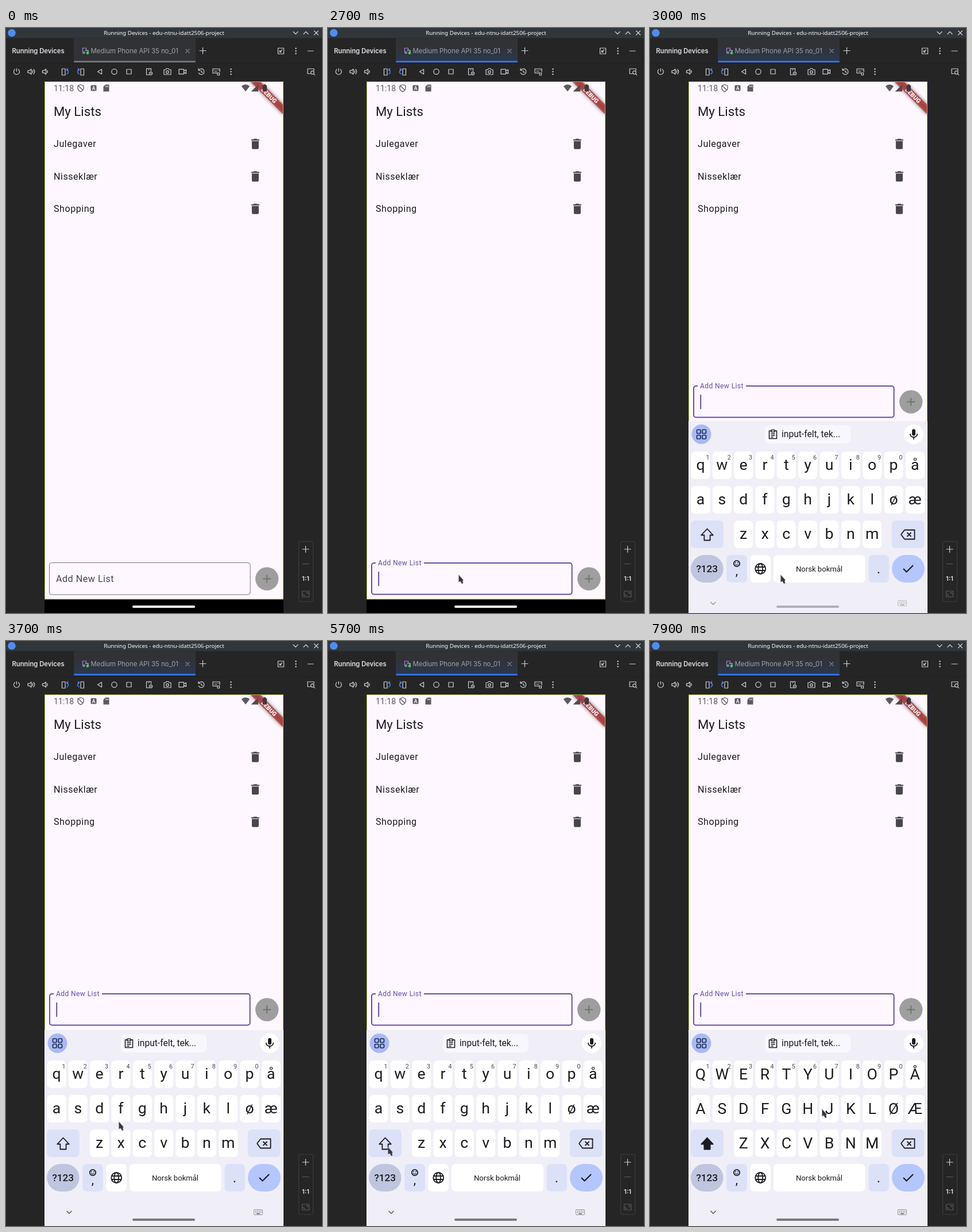
Animation, 550 px wide and 1018 px high, one loop 8 s. Source, as an HTML page:

```html
<!DOCTYPE html>
<html lang="en">
<head>
<meta charset="utf-8">
<title>Running Devices</title>
<style>
html, body { margin: 0; width: 100%; height: 100%; overflow: hidden; background: #252526; }
svg { display: block; width: 100vw; height: 100vh; }
.ui { font-family: Inter, sans-serif; }
.app { font-family: Roboto, sans-serif; }
.line { fill: none; stroke: #ced0d6; stroke-width: 1.2; stroke-linecap: round; stroke-linejoin: round; }
.dim { stroke: #5a5c60; }
.blue { stroke: #548af7; }
.ink { fill: none; stroke: #1b1b21; stroke-width: 1.8; stroke-linejoin: round; }
</style>
</head>
<body>
<svg id="stage" viewBox="0 0 550 1018" xmlns="http://www.w3.org/2000/svg">
  <defs>
    <linearGradient id="tabLive" x2="0" y2="1"><stop offset=".3" stop-color="#313235"/><stop offset="1" stop-color="#2b3850"/></linearGradient>
    <clipPath id="screen"><rect x="67" y="93" width="416" height="925"/></clipPath>
    <filter id="soft" x="-20%" y="-100%" width="140%" height="300%"><feGaussianBlur stdDeviation="3"/></filter>
  </defs>
  <rect width="550" height="1018" fill="#252526"/>
  <g id="frame" class="ui"></g>
  <g id="phone" class="app" clip-path="url(#screen)">
    <g id="home"></g>
    <g id="field"></g>
    <g id="nav"></g>
    <g id="keys"></g>
    <rect id="pill" x="220" y="1005" width="109" height="4" rx="2"/>
  </g>
  <path id="mouse" d="M.4 .4V13.2l2.9-1.5 2.9 4.5 2.1-1.2-.9-4 1.3-1.2z" fill="#38373c" stroke="#a9a6ad" stroke-width=".6"/>
</svg>
<script>
const LOOP = 8000;
const $ = id => document.getElementById(id);
const at = (x, y, body, extra = '') => `<g transform="translate(${x} ${y})" ${extra}>${body}</g>`;
const path = (d, cls = 'line', extra = '') => `<path class="${cls}" d="${d}" ${extra}/>`;
const rect = (x, y, w, h, r, fill, extra = '') =>
  `<rect x="${x}" y="${y}" width="${w}" height="${h}" rx="${r}" fill="${fill}" ${extra}/>`;
const disc = (x, y, r, fill, extra = '') => `<circle cx="${x}" cy="${y}" r="${r}" fill="${fill}" ${extra}/>`;
const ring = (x, y, r, cls = 'line') => `<circle class="${cls}" cx="${x}" cy="${y}" r="${r}"/>`;
const text = (x, y, size, fill, body, extra = '') =>
  `<text x="${x}" y="${y}" font-size="${size}" fill="${fill}" ${extra}>${body}</text>`;
const MID = 'text-anchor="middle"';
const dots = (x, y) => [-4.5, 0, 4.5].map(d => disc(x, y + d, 1.2, '#ced0d6')).join('');

function buildFrame() {
  const speaker = 'M-5.5-1.8h2.3L.5-4.6v9.2l-3.7-2.8h-2.3z';
  $('frame').innerHTML =
    rect(0, 0, 550, 17.5, 0, '#31363b') +
    disc(10, 8.5, 6.8, '#4f8cf0') +
    text(275, 12, 9.83, '#fcfcfc', 'Running Devices - edu-ntnu-idatt2506-project', MID + ' font-family="Noto Sans, sans-serif"') +
    at(504, 8.5, path('M-4-2L0 2 4-2')) + at(522, 8.5, path('M-4 2L0-2 4 2')) +
    at(540, 8.5, path('M-3.5-3.5l7 7M-3.5 3.5l7-7')) +
    rect(0, 61, 550, 1, 0, '#1f2021') +
    text(10.5, 44, 11.25, '#dfe1e5', 'Running Devices', 'font-weight="600"') +
    rect(118, 18, 212, 42, 0, '#313235', 'id="tab"') +
    rect(118, 57, 212, 3, 1.5, '#6f737a', 'id="mark"') +
    at(138, 39.5, path('M-4.5 2.5v-7h6v3', 'line', 'style="stroke:#a982e0"') +
      path('M-4.5 2.5h4M0-.5h5v2M-1 4.5h-3') + disc(4, 4, 2.4, '#3fd15a')) +
    text(147.5, 44, 11.4, '#a0a3a8', 'Medium Phone API 35 no_01') +
    at(316, 40, path('M-3-3l6 6M-3 3l6-6', 'line', 'style="stroke:#86888d"')) +
    at(342.5, 39.5, path('M-5.5 0h11M0-5.5v11')) +
    at(478.5, 40, path('M-5-5h10v10h-10zM2-2l-4 4M-2-1v3h3')) +
    dots(504.5, 40) + at(530, 40, path('M-5 0h10')) +
    at(18.5, 76, path('M-3-4a5 5 0 1 0 6 0M0-5.5v5')) +
    at(43.5, 76, path(speaker + 'M2.5-2q1.7 2 0 4M4.5-4q3.6 4 0 8')) +
    at(69, 76, path(speaker + 'M2.5-2q1.7 2 0 4')) +
    at(103, 76, path('M-5.5-5h5.5v11h-5.5z') + path('M2.5 4c4-1 4-7 0-8M5-5.5l-2.7 1.4 1.4 2.6', 'line blue')) +
    at(130, 76, path('M0-5h5.5v11h-5.5z') + path('M-2.5 4c-4-1-4-7 0-8M-5-5.5l2.7 1.4-1.4 2.6', 'line blue')) +
    at(163, 76, path('M3.5-4.2v8.4L-3.5 0z')) + ring(188.5, 76, 4.7) +
    at(214, 76, path('M-4-4h8v8h-8z')) +
    at(249, 76, path('M0 5.5h-4.5v-11h8v4M-1.5-3.5h2') + ring(3, 3, 2.7) + disc(3, 3, .9, '#ced0d6')) +
    at(281, 76, path('M-6-3.5h3l1.3-2h3.4l1.3 2h3v8.5h-12z') + ring(0, .6, 2.3)) +
    at(307, 76, path('M-6-4.2h8.5v8.4h-8.5zM2.5-1l4-2.4v6.8l-4-2.4')) +
    at(340, 76, path('M-4.5-2.5a5 5 0 1 1-.2 4.5M-5-5.3v3h3M0-2v2.4l2 1')) +
    at(366, 76, path('M1 2.5h-7v-7.5h12v5M-3.5-2.5h.2M-1-2.5h.2M1.5-2.5h.2M4-2.5h.2M-3 0h4M2 2h3.5v4h-3.5z')) +
    dots(391.5, 76) +
    at(531, 76, path('M-1 3.5h-5v-8.5h11v3') + ring(2.3, 1.5, 2.8) + path('M4.5 3.7l2 2.2')) +
    rect(509.5, 893.5, 25, 104.5, 2, 'none', 'stroke="#3c3e41"') +
    at(521.5, 907, path('M-5.5 0h11M0-5.5v11')) +
    at(521.5, 932.5, path('M-5.5 0h11', 'line dim')) +
    text(521.5, 962.3, 11, '#dfe1e5', '1:1', MID + ' font-weight="600"') +
    at(521.5, 985, path('M-6-5h12v10h-12zM-3.5 0v2.5h2.5M3.5 0v-2.5h-2.5', 'line dim'));
}

function buildHome() {
  const bin = path('M6 19c0 1.1.9 2 2 2h8c1.1 0 2-.9 2-2V7H6v12zM19 4h-3.5l-1-1h-5l-1 1H5v2h14V4z', '', 'fill="#49454f"');
  const row = (name, i) => {
    const y = 201.8 + 56.5 * i;
    return text(83, y + 5.6, 16.14, '#1d1b20', name, 'letter-spacing=".5"') + at(421.9, y - 12, bin);
  };
  const gray = '#5d595f';
  $('home').innerHTML =
    rect(67, 93, 416, 901, 0, '#fef7ff') +
    text(83, 153.1, 22.2, '#1d1b20', 'My Lists') +
    ['Julegaver', 'Nisseklær', 'Shopping'].map(row).join('') +
    `<g transform="translate(482 93) rotate(45)">
      ${rect(-40.3, 28.2, 80.6, 12.1, 0, '#000', 'opacity=".5" filter="url(#soft)"')}
      ${rect(-60, 28.2, 120, 12.1, 0, '#b71c1c', 'opacity=".627"')}
      ${text(0, 37.9, 10.3, '#fff', 'DEBUG', MID + ' font-weight="900"')}</g>` +
    text(83, 109.6, 14.1, gray, '11:18') +
    at(130, 104.5, path('M0-6l5 2v4c0 3-2 5-5 6.3c-3-1.3-5-3.3-5-6.3v-4zM-4-4L4 4', 'ink', `style="stroke:${gray};stroke-width:1.3"`)) +
    rect(147.5, 99.5, 10, 10, 1.5, gray) +
    text(152.5, 107.6, 8.5, '#fef7ff', 'A', MID + ' font-weight="700"') +
    at(174.5, 104.5, path('M-1.5-6h6.5v12h-10v-8.5z', '', `fill="${gray}"`) +
      path('M-1-4v2.5M1-4v2.5M3-4v2.5', '', 'stroke="#fef7ff" stroke-width=".9"')) +
    path('M409.8 101.2q7.2-5.7 14.4 0l-7.2 9.2z', '', `fill="${gray}"`) +
    path('M439 98.5v12h-12.5z', '', 'fill="#57484e"') +
    rect(446.5, 99.5, 7.5, 11, 1.2, '#45353a') + rect(448.6, 98, 3.3, 2, .5, '#45353a');
  $('nav').innerHTML = rect(67, 994, 416, 24, 0, '#000') +
    rect(67.5, 93.5, 415, 900.5, 0, 'none', 'stroke="#9ab63c"');
}

function buildKeys() {
  const TINT = '#dde1f8', INK = '#1b1b21', SOFT = '#5b5b62';
  const col = i => 88 + 37.33 * i;
  const key = (x, y, w, fill, r = 7) => rect(x - w / 2, y - 24, w, 48, r, fill);
  const letters = (row, y, first) => [...row].map((c, i) =>
    key(col(first + i), y, 33, '#fff') +
    text(col(first + i), y + 8, 26.6, INK, c, MID + ' class="letter"')).join('');
  const hints = [...'1234567890'].map((d, i) => text(col(i) + 12.5, 743.6, 10.8, '#44464f', d, MID)).join('');
  const tiles = [[-8, -8], [1.5, -8], [-8, 1.5], [1.5, 1.5]]
    .map(([x, y]) => rect(x, y, 6.5, 6.5, 1.6, 'none', 'stroke="#1c2b5c" stroke-width="1.7"')).join('');
  const pads = [-4.5, -1.5, 1.5, 4.5].map(x => rect(x - .6, -2.5, 1.3, 1.3, 0, SOFT) + rect(x - .6, 0, 1.3, 1.3, 0, SOFT)).join('');
  $('keys').innerHTML =
    rect(67, 677, 416, 400, 0, '#f0eff8') +
    disc(89.5, 700, 17, '#a9baf3') + at(89.5, 700, tiles) +
    rect(200, 684, 149, 32, 8, '#f8f7fe') +
    at(214, 700, path('M-3-6h-3.5v13.5h13v-13.5h-3.5M-3-7.5h6v3.5h-6zM-3.5-1h7M-3.5 2h7M-3.5 5h4', 'ink', 'style="stroke-width:1.6"')) +
    text(229, 705.3, 15.6, INK, 'input-felt, tek...') +
    disc(459, 700, 17, '#fff') +
    at(459, 700, rect(-3, -9, 6, 11.5, 3, INK) + path('M-6.2-1c0 8 12.4 8 12.4 0M0 5v4', 'ink')) +
    letters('qwertyuiopå', 754, 0) + hints +
    letters('asdfghjkløæ', 814, 0) +
    letters('zxcvbnm', 874, 2) +
    key(99.5, 874, 57, TINT) +
    at(99.5, 874.5, path('M0-10L10.3 1h-5.2v9h-10.2v-9h-5.2z', 'ink', 'id="shift"')) +
    key(449.2, 874, 57, TINT) +
    at(449, 874.5, path('M-12 0l6-8h17.5v16h-17.5zM-1.5-3.5l7 7M-1.5 3.5l7-7', 'ink')) +
    key(99.3, 934, 56.5, '#bfc5de', 24) + text(99.3, 940, 17.2, INK, '?123', MID + ' font-weight="500"') +
    key(151, 934, 36, TINT) +
    at(151, 925, ring(0, 0, 5.2, 'ink') + disc(-2, -1.5, 1, INK) + disc(2, -1.5, 1, INK) +
      path('M-2.8 1.2q2.8 3 5.6 0', 'ink', 'style="stroke-width:1.2"')) +
    text(151, 945, 22, INK, ',', MID) +
    key(192.2, 934, 35.5, '#fff') +
    at(192.2, 934, ring(0, 0, 9, 'ink') + '<ellipse class="ink" rx="4" ry="9"/>' + path('M-8.5-3h17M-8.5 3h17', 'ink')) +
    key(294.8, 934, 159.5, '#fff') + text(294.5, 938.5, 13.1, INK, 'Norsk bokmål', MID) +
    key(398.2, 934, 35.5, TINT) + text(398, 942, 24, INK, '.', MID) +
    key(449.5, 934, 57, '#b4c6fc', 24) +
    at(449.5, 934, path('M-8.5 0l5.5 5.5 11.5-11.5', 'ink', 'style="stroke-width:2.2"')) +
    '<g id="navIcons">' +
    at(110, 994, path('M-4.5-2.2L0 2.3 4.5-2.2', 'ink', `style="stroke:${SOFT};stroke-width:1.5"`)) +
    at(439, 994, rect(-7.5, -4.5, 15, 9, 1, 'none', `stroke="${SOFT}" stroke-dasharray="1.5 .8"`) + pads + rect(-3, 2, 6, 1.2, 0, SOFT)) +
    '</g>';
}

function buildField() {
  $('field').innerHTML =
    path('', '', 'id="box" fill="none"') +
    text(87, 0, 16, '#49454f', 'Add New List', 'id="label"') +
    rect(87.2, 629, 2, 25, 0, '#6250a4', 'id="caret"') +
    disc(454.2, 641.5, 20.2, '#9e9e9e') +
    path('M454.2 634.5v14M447.2 641.5h14', '', 'stroke="#727272" stroke-width="2"');
}

// Outline drawn inside its bounds, with a gap in the top edge for the label.
function outline(width, gapLeft, gapRight) {
  const d = width / 2, l = 75 + d, r = 425.6 - d, t = 613 + d, b = 669.5 - d;
  return `M${gapRight} ${t}H${r - 4}a4 4 0 0 1 4 4V${b - 4}a4 4 0 0 1-4 4H${l + 4}a4 4 0 0 1-4-4V${t + 4}a4 4 0 0 1 4-4H${gapLeft}`;
}

// Rows are [time, values...]; values run linearly between rows.
function sample(rows, t) {
  let i = rows.findIndex(r => r[0] > t);
  if (i < 0) i = rows.length;
  const a = rows[Math.max(i - 1, 0)], b = rows[Math.min(i, rows.length - 1)];
  const k = b[0] > a[0] ? (t - a[0]) / (b[0] - a[0]) : 0;
  return a.slice(1).map((v, j) => v + (b[j + 1] - v) * k);
}

const MOUSE = [
  [700, 515, 613], [800, 450, 574], [900, 400, 546], [1000, 384, 540], [1700, 384, 540],
  [1800, 376, 556], [2000, 290, 780], [2100, 240, 915], [2200, 227, 951], [3300, 227, 951],
  [3500, 215, 915], [3700, 196, 836], [3800, 200, 814], [3900, 225, 802], [4200, 320, 807],
  [4300, 324, 809], [4500, 240, 804], [4600, 200, 805], [4700, 200, 805], [5000, 150, 836],
  [5200, 113, 851], [5400, 113, 851], [5700, 104, 880], [6300, 107, 876], [6400, 106, 880],
  [7300, 106, 880], [7500, 125, 871], [7700, 225, 828], [7800, 280, 816], [7900, 299, 814]
];
// field offset, keyboard offset
const RISE = [[2700, 317, 341], [2800, 150, 115], [2900, 37, 27.5], [3000, 9, 7], [3100, 0, 0]];
// pill red, green, blue, icon opacity
const NAV = [[2800, 255, 255, 255, 0], [2900, 229, 228, 235, .15], [3100, 122, 121, 127, 1]];

let caps = null;
function setCaps(on) {
  if (on === caps) return;
  caps = on;
  for (const el of document.querySelectorAll('.letter')) {
    el.textContent = on ? el.textContent.toUpperCase() : el.textContent.toLowerCase();
    el.setAttribute('dy', on ? 1.3 : 0);
  }
  $('shift').style.fill = on ? '#1b1b21' : 'none';
}

function set(id, attrs) {
  for (const name in attrs) $(id).setAttribute(name, attrs[name]);
}

function draw(time) {
  const t = Math.floor(time / 100) * 100;
  const [mx, my] = sample(MOUSE, t);
  set('mouse', { transform: `translate(${mx} ${my})`, visibility: t < 700 ? 'hidden' : 'visible' });

  const live = t >= 1400;
  set('tab', { fill: live ? 'url(#tabLive)' : '#313235' });
  set('mark', { fill: live ? '#356fe0' : '#6f737a' });

  const [lift, slide] = sample(RISE, t);
  set('field', { transform: `translate(0 ${lift})` });
  set('keys', { transform: `translate(0 ${slide})`, visibility: t < 2800 ? 'hidden' : 'visible' });

  const focus = t >= 2600;
  const [float] = sample([[2500, 0], [2700, 1]], t);
  const left = 87 - 4 * float, weight = focus ? 2 : 1;
  set('box', {
    d: outline(weight, left, left + 84 * float),
    stroke: focus ? '#6250a4' : '#79747e',
    'stroke-width': weight
  });
  set('label', {
    y: 646.8 - 28.6 * float,
    'font-size': 16.14 - 4.04 * float,
    'letter-spacing': .5 - .125 * float,
    fill: focus ? '#6250a4' : '#49454f'
  });
  const blinkOn = focus && Math.floor((t - 2600) / 500) % 2 === 0;
  set('caret', { visibility: blinkOn ? 'visible' : 'hidden' });

  const [r, g, b, icons] = sample(NAV, t);
  set('pill', { fill: `rgb(${r},${g},${b})` });
  set('navIcons', { opacity: icons });
  setCaps(t >= 7300);
}

buildFrame();
buildHome();
buildField();
buildKeys();
const start = performance.now();
(function tick() {
  draw((performance.now() - start) % LOOP);
  requestAnimationFrame(tick);
})();
</script>
</body>
</html>
```
